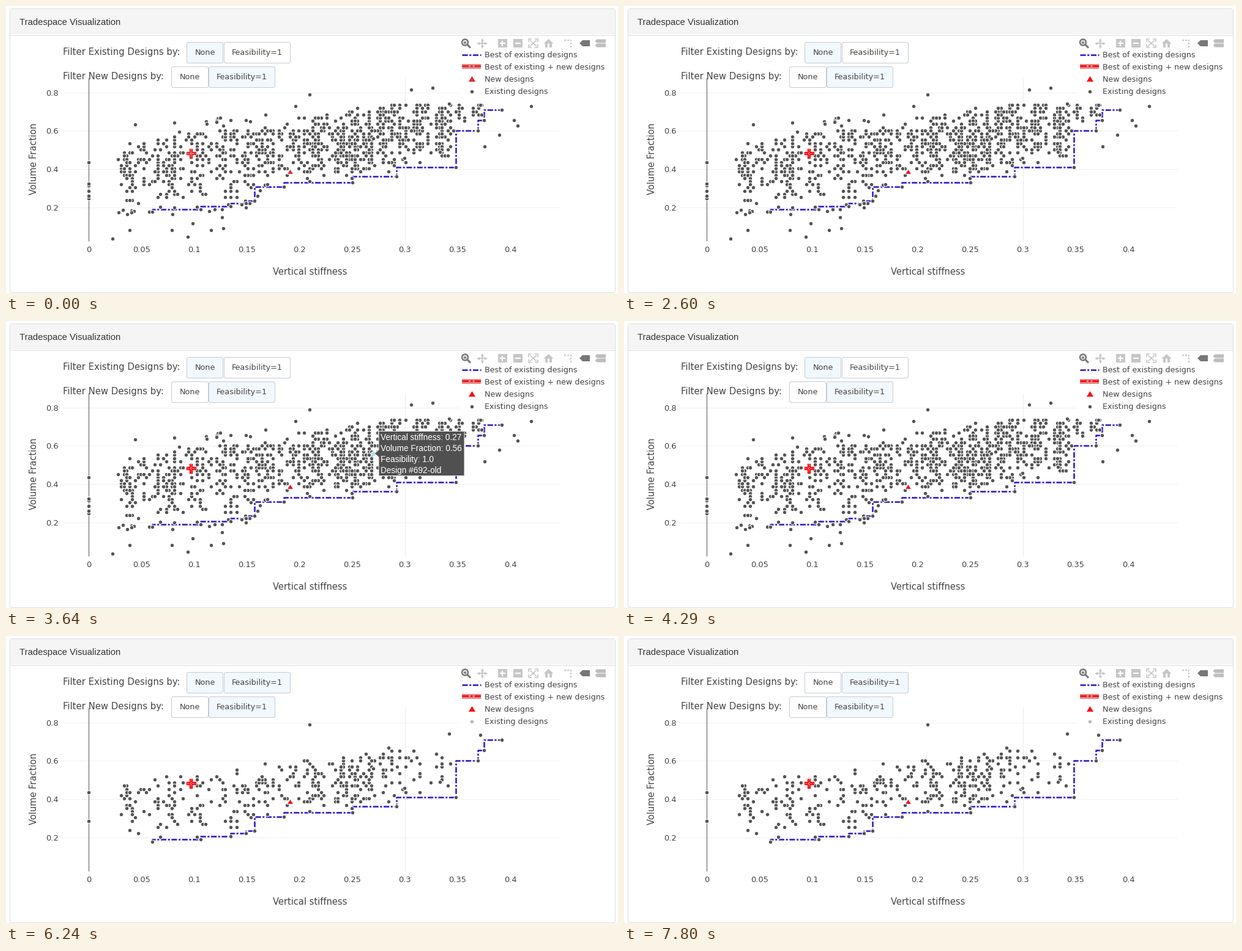
Write a matplotlib script that moves like this. It is 1000 by 470 pixels and loops after 8000 ms.

```python
import numpy as np
import matplotlib.pyplot as plt
from matplotlib.animation import FuncAnimation
from matplotlib.patches import Circle, FancyBboxPatch, Polygon, Rectangle
from matplotlib.path import Path

W, H, DPI = 1000, 470, 100
LOOP, STEP = 8000, 40
PT = 72 / DPI
INK, DOT, BLUE = "#444444", "#545454", "#3418cf"
ACTIVE, EDGE = "#f1f8fe", "#c3ccd6"
DARK, PALE = "#777777", "#c6c6c6"

# start, end, moment the label turns cyan, position, values, id
HOVERS = [(1820, 2470, 1950, 709, 239, 0.33, 0.49, 888),
          (2860, 3380, 2990, 651, 248.7, 0.30, 0.46, 779),
          (3640, 4290, 3900, 600, 217, 0.27, 0.56, 692)]

fig = plt.figure(figsize=(W / DPI, H / DPI), dpi=DPI, facecolor="white")
ax = fig.add_axes([0, 0, 1, 1])
ax.set(xlim=(0, W), ylim=(H, 0))
ax.axis("off")


def text(x, y, s, px, color=INK, font="DejaVu Sans", **kw):
    return ax.text(x, y, s, fontsize=px * PT, color=color, fontfamily=font, **kw)


def line(xs, ys, color, px=1, z=1, **kw):
    return ax.plot(xs, ys, color=color, lw=px * PT, zorder=z,
                   solid_capstyle="butt", dash_capstyle="butt", **kw)[0]


def marks(xs, ys, shape, px, color, z, edge_px=1.0):
    return ax.plot(xs, ys, ls="", marker=shape, ms=px * PT, mfc=color, mec="white",
                   mew=edge_px * PT, zorder=z)[0]


def rect(x0, y0, x1, y1, color, z=1):
    ax.add_patch(Rectangle((x0, y0), x1 - x0, y1 - y0, fc=color, ec="none", zorder=z))


def rounded(x0, y0, x1, y1, r, fill, edge, z=1):
    return ax.add_patch(FancyBboxPatch(
        (x0, y0), x1 - x0, y1 - y0, boxstyle=f"round,pad=0,rounding_size={r}",
        fc=fill, ec=edge, lw=PT, zorder=z))


def poly(points, color, z=8):
    ax.add_patch(Polygon(points, fc=color, ec="none", zorder=z))


def sx(v):
    return 135.3 + 1722 * v


def sy(v):
    return 392.2 - 313.3 * v


# Panel
rounded(6.5, 4.5, 995.5, 469.5, 4, "white", "#dddddd", 0)
rect(7, 5, 995, 47, "#f4f5f4", 0.5)
line([7, 995], [47.5, 47.5], "#dddddd")
text(22, 31, "Tradespace Visualization", 14.8, "#333333", "Liberation Sans")

# Axes
for v in (0.2, 0.4, 0.6, 0.8):
    line([92, 904], [sy(v)] * 2, "#f0f0f0")
    text(86, sy(v), f"{v}", 13, ha="right", va="center_baseline")
line([sx(0.3)] * 2, [118, 385], "#ebebeb")
line([sx(0)] * 2, [118, 385], "#555555", 1, 2)
for k in range(9):
    text(sx(k * 0.05), 402.7, f"{k * 0.05:.3g}", 13, ha="center")
text(497, 440, "Vertical stiffness", 14.65, ha="center")
text(50, 250.5, "Volume Fraction", 14.6, rotation=90, rotation_mode="anchor", ha="center")

# Frontier
front = np.array([(238.5, 337), (318, 332.5), (367, 328), (391.5, 322.5), (405.5, 318.5),
                  (453.5, 296), (565.5, 289), (638, 278.5), (734.5, 263.5),
                  (770.5, 204), (781, 187), (810, 169.5)])
DASH = (0, (3.5, 1, 1.2, 1))
line(*front.T, BLUE, 2.6, 3, drawstyle="steps-pre", ls=DASH)


def front_y(x):
    return front[np.searchsorted(front[:, 0], x), 1]


# Design clouds: random cells of a fine grid, between a sloping top and the frontier
rng = np.random.default_rng(8)
gx, gy = np.meshgrid(np.arange(183.4, 790, 4.6), np.arange(157, 348, 5.2))
column = rng.uniform(0.25, 1.6, gx.shape[1]) ** 1.4
free = np.ones(gx.shape)


def cloud(n, top, peak, spread, end, sink):
    """n cells: dense around x = peak, fading out towards x = end."""
    u = np.clip((gy - top) / (front_y(gx) - top), 0, 1)
    density = 0.7 + 0.5 * np.exp(-((gx - peak) / spread) ** 2)
    density *= np.clip((end - gx) / 120, 0, 1)
    profile = u ** 0.4 * (1 - u) ** sink
    w = free * column * density * profile / (front_y(gx) - top)
    pick = rng.choice(gx.size, n, replace=False, p=(w / w.sum()).ravel())
    free.flat[pick] = 0
    return np.column_stack([gx.flat[pick], gy.flat[pick]])


def strays(n, x0, x1, edge, reach):
    x = rng.uniform(x0, x1, n)
    return np.column_stack([x, edge(x) + rng.exponential(1, n) * reach])


feasible = np.vstack([
    cloud(325, 238 - 0.125 * (gx - 183), 530, 70, 750, 0.7), front,
    [h[3:5] for h in HOVERS], [(135, 256), (135, 303), (496, 145), (724, 160), (775, 162)]])
others = np.vstack([
    cloud(440, np.maximum(157, 226 - 0.15 * (gx - 183)), 600, 110, 835, 1.2),
    strays(26, 165, 440, lambda x: front_y(x) - 4, 15),
    strays(14, 190, 500, lambda x: 222 - 0.15 * (x - 183), -11),
    np.column_stack([np.full(7, 135), rng.normal(303, 14, 7)]),
    [(662, 137), (697, 134), (858, 164), (830, 187), (836, 196), (806, 211), (782, 230),
     (211, 194), (202, 367), (271, 367)]])

other_dots = marks(*others.T, "o", 6.5, DOT, 4)
marks(*feasible.T, "o", 6.5, DOT, 4.1)
hover_dot = marks([], [], "o", 7.5, "#a9dcf4", 4.5)

# New designs
TRIANGLE = Path([(-1, -0.75), (1, -0.75), (0, 0.85), (-1, -0.75)], closed=True)
triangle = marks([464], [270.5], TRIANGLE, 10.5, "red", 5)
cross = marks([302.3], [240.5], "P", 17, "red", 5, 0.6)
for xs, ys in (([296, 309], [240.5] * 2), ([302.3] * 2, [234, 247])):
    line(xs, ys, "#ffd5d5", 1, 5.5, ls=(0, (2, 2)))

# Legend
rect(740, 69, 985, 150, "white", 6)
line([745, 776], [79.5] * 2, BLUE, 2.6, 7, ls=DASH)
rect(745, 95, 776, 103, "#e88686", 7)
red_dash = line([745, 776], [97.5] * 2, "red", 3, 7.5, ls=DASH)
key_triangle = marks([760.5], [118.5], TRIANGLE, 13, "red", 7)
key_dot = marks([760.5], [139.5], "o", 6.5, DOT, 7)
for k, s in enumerate(("Best of existing designs", "Best of existing + new designs",
                       "New designs", "Existing designs")):
    text(782, 84 + 19.9 * k, s, 12.65, zorder=7)


# Filter rows
def button(x0, x1, y, label):
    box = rounded(x0 + .5, y + .5, x1 - .5, y + 34.5, 3, "white", EDGE, 7)
    text((x0 + x1) / 2, y + 21, label, 12.7, ha="center", zorder=8)
    return box


text(93, 80.3, "Filter Existing Designs by:", 14.85, zorder=7)
text(93, 120.3, "Filter New Designs by:", 14.85, zorder=7)
none_btn = button(295, 355, 59, "None")
feas_btn = button(356, 465, 59, "Feasibility=1")
button(270, 331, 99, "None")
button(331, 440, 99, "Feasibility=1").set_facecolor(ACTIVE)


# Toolbar
def plus(x, y, r, color, px, z):
    line([x - r, x + r], [y] * 2, color, px, z)
    line([x] * 2, [y - r, y + r], color, px, z)


ax.add_patch(Circle((750, 59.5), 5, fc="#e4e4e4", ec=DARK, lw=2.4 * PT, zorder=8))
plus(750, 59.5, 2, DARK, 1.6, 9)
line([753.5, 759], [63, 68.5], DARK, 3, 8)
plus(777.5, 61, 7, PALE, 1.8, 8)
for shape, dx, dy in (("<", -6.5, 0), (">", 6.5, 0), ("^", 0, -6), ("v", 0, 6)):
    marks([777.5 + dx], [61 + dy], shape, 5, PALE, 8, 0)
for x in (811, 836):
    rect(x - 7.5, 54, x + 7.5, 68, PALE, 8)
plus(811, 61, 4.5, "white", 2.2, 9)
line([831.5, 840.5], [61] * 2, "white", 2.2, 9)
for i in (-1, 1):
    line([856, 867], [61 - 5 * i, 61 + 5 * i], PALE, 1.6, 8)
    for j in (-1, 1):
        cx, cy = 861.5 + 7.5 * i, 61 + 7 * j
        line([cx - 5 * i, cx, cx], [cy, cy, cy - 5 * j], PALE, 1.6, 8)
poly([(878.5, 61.5), (886.5, 54), (894.5, 61.5)], PALE)
for x in (881, 888):
    rect(x, 61, x + 4, 68, PALE, 8)
line([912, 923, 923], [56, 56, 68], PALE, 2, 8, ls=(0, (1.5, 1)))


def tag(x, y, w, h, color):
    poly([(x, y), (x + h, y - h), (x + w, y - h), (x + w, y + h), (x + h, y + h)], color)


tag(937, 61, 17, 5, DARK)
tag(962.5, 57.5, 17.5, 3, "#bdbdbd")
tag(962.5, 64.5, 17.5, 3, "#bdbdbd")

# Tooltip
tip = ax.add_patch(Polygon([(0, 0)] * 3, lw=PT, zorder=10))
tip_text = [text(0, 0, "", 13.6, font="Liberation Sans", zorder=11) for _ in range(4)]


def show_tip(t):
    hit = next((h for h in HOVERS if h[0] <= t < h[1]), None)
    for a in (tip, hover_dot, *tip_text):
        a.set_visible(hit is not None)
    if hit is None:
        return
    _, _, turn, x, y, stiff, vol, num = hit
    cyan = t >= turn
    l, r, top, low = x + 9, x + 149, y - 36.5, y + 36.5
    tip.set_xy([(x + 2, y), (l, y - 6), (l, top), (r, top), (r, low), (l, low), (l, y + 6)])
    tip.set(facecolor="#00ffff" if cyan else "#505050",
            edgecolor="#444444" if cyan else "#f4f4f4")
    rows = (f"Vertical stiffness: {stiff:.2f}", f"Volume Fraction: {vol:.2f}",
            "Feasibility: 1.0", f"Design #{num}-old")
    for k, (a, s) in enumerate(zip(tip_text, rows)):
        a.set(text=s, position=(l + 3.5, y - 22.3 + 18 * k),
              color=INK if cyan else "white")
    hover_dot.set_data([x], [y])
    hover_dot.set_markerfacecolor("#5fe6f5" if cyan else "#a9dcf4")


def update(i):
    t = i * STEP + STEP - 10
    show_tip(t)
    red = "#dc2c30" if t < 1040 else "#fb0d14"
    for a in (triangle, cross, key_triangle):
        a.set_markerfacecolor(red)
    red_dash.set_color(red)
    filtered = t >= 6240
    other_dots.set_visible(not filtered)
    key_dot.set_markerfacecolor("#b9b9b9" if filtered else DOT)
    none_btn.set_facecolor(ACTIVE if t < 7150 else "white")
    feas_btn.set_facecolor(ACTIVE if t >= 4810 else "white")
    feas_btn.set_width(110 if 4810 <= t < 6240 else 108)
    return []


anim = FuncAnimation(fig, update, frames=LOOP // STEP, interval=STEP,
                     repeat=True, repeat_delay=0, blit=False)
plt.show()
```
